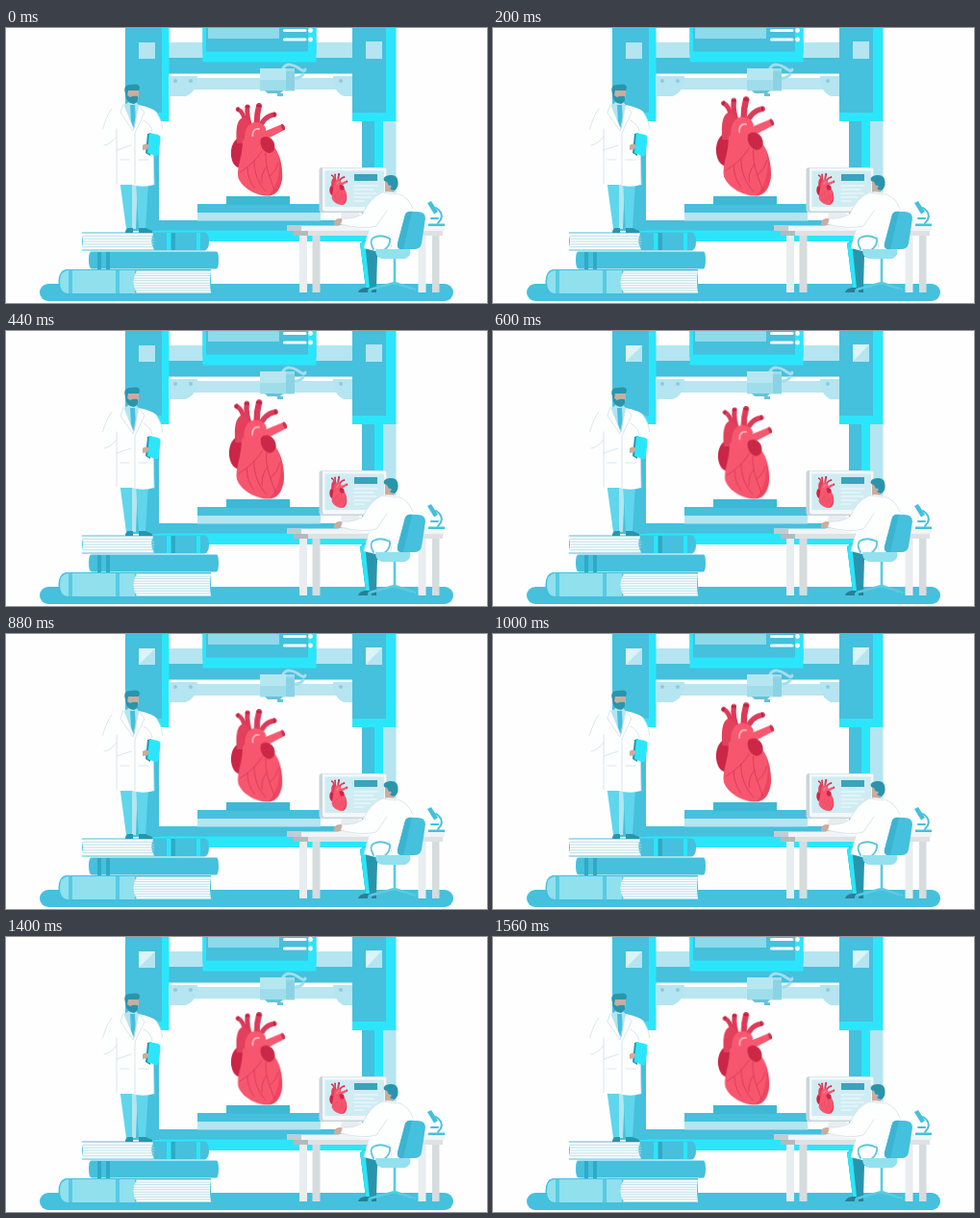
Animation of 500 by 286 pixels, one loop 1600 ms. Source, as an HTML page:

```html
<!DOCTYPE html>
<html lang="en">
<head>
<meta charset="utf-8">
<title>Heart printer</title>
<style>
html, body { margin: 0; width: 100%; height: 100%; overflow: hidden; background: #fefefe; }
svg { display: block; width: 100vw; height: 100vh; }
.m { fill: #45c0dd; }
.c { fill: #2be6fa; }
.l { fill: #b4e5f0; }
.d { fill: #2995ad; }
.w { fill: #fdfefe; }
.g { fill: #e9edef; }
.skin { fill: #c9ada0; }
.line { fill: none; stroke-linecap: round; stroke-linejoin: round; }
.fold { stroke: #cfe0e7; stroke-width: .8; }
#heart { transform-origin: 262px 174.5px; animation: beat 800ms step-end infinite; }
.glint { fill: #eefafc; animation: glint 1600ms step-end infinite; }
@keyframes beat { 0% { transform: none; } 25% { transform: scale(1.07); } 75% { transform: none; } }
@keyframes glint { 0% { opacity: 0; } 37.5% { opacity: .7; } }
</style>
</head>
<body>
<svg viewBox="0 0 500 286" preserveAspectRatio="none">
<defs>
  <g id="organ">
    <path d="M244 114C237 114 233 124 234 133C235 141 239 146 245 146L253 122Z" fill="#cb2648"/>
    <g class="line" stroke="#dc3a58" stroke-width="5" stroke-linecap="butt">
      <path d="M241 84.500Q247 87 249 100" stroke-width="4.500"/>
      <path d="M251 82Q250 92 254 103"/>
      <path d="M263 81Q260 92 261 104" stroke-width="6"/>
      <path d="M279 90Q267 92 263 106"/>
    </g>
    <path d="M240 120C238 104 241 91 249 94C254 97 255 104 254 120Z" fill="#e2405c"/>
    <path d="M249 122C246 106 252 97 261 98C268 99 271 104 270 107L287 100Q291 102 289.500 106L270 116L263 129Z" fill="#f7586f"/>
    <path d="M257 117C255 108 258 104 263 105" class="line" stroke="#fbb0b8" stroke-width="1.800"/>
    <path d="M246 117C252 110 262 114 270 116C279 121 285 131 286.500 144C288 160 283 173 273 174.500C261 175 246 167 241.500 156C239 146 246 135 246 117Z" fill="#f7566f"/>
    <path d="M283 132C286 141 288 150 287 158C285 168 281 174 273 174.500C283 163 286 148 283 132Z" fill="#ed4560"/>
    <path d="M265 115C269 111 276 113 278.500 119C281 125 278 130 273 130C267 129 263 121 265 115Z" fill="#cb2848"/>
    <ellipse cx="288" cy="103" rx="1.600" ry="3.400" fill="#cf3050" transform="rotate(-24 288 103)"/>
    <g fill="#bd2442">
      <ellipse cx="241" cy="84.500" rx="2.400" ry="1.300" transform="rotate(-60 241 84.500)"/>
      <ellipse cx="251" cy="82" rx="2.600" ry="1.200"/>
      <ellipse cx="263" cy="81" rx="3" ry="1.300" transform="rotate(9 263 81)"/>
      <ellipse cx="279" cy="90" rx="1.300" ry="2.600" transform="rotate(-10 279 90)"/>
    </g>
    <g class="line" stroke="#cf3852" stroke-width=".7">
      <path d="M266 128C259 139 251 145 243 150M258 138C258 151 262 161 270 170M251 145Q251 157 258 166"/>
      <path d="M270 130C269 146 276 158 279 169M271 144Q265 151 266 161M274 154Q281 149 283 140"/>
    </g>
  </g>
</defs>

<rect width="500" height="286" fill="#fefefe"/>

<!-- printer -->
<rect x="35" y="266" width="430" height="18" rx="9" class="m"/>
<path class="l" d="M124 95h7v105h-7zM392 95h13.500v105h-13.500z"/>
<path class="c" d="M147 210h250v12h-250zM383 95h9v120h-9z"/>
<path class="m" d="M131 95h28v116h-28zM370 95h13v116h-13z"/>
<path class="m" d="M158 200h226v10.500h-226z"/>
<path class="l" d="M199 191h128v9.500h-128z"/>
<path class="m" d="M199 183h128v9h-128z"/>
<path d="M229 175h66v9h-66z" fill="#3fb8d5"/>
<path class="l" d="M169 15h192v17h-192z"/>
<path class="m" d="M169 31h192v16.500h-192z"/>
<path class="c" d="M124 0h45.500v97h-45.500zM360 0h45.500v97h-45.500z"/>
<path class="m" d="M124 0h38v88h-38zM360 0h35v88h-35z"/>
<path class="l" d="M138 15h17v17h-17zM374 14h17v18h-17z"/>
<path class="glint" d="M138 32V15h17zM374 32V14h17z"/>
<path d="M190 52h160v12h-160z" fill="#b9e6f0"/>
<path class="l" d="M169.500 50H199Q199 66 187 71H169.500zM360 50H340Q340 66 351 71H360z"/>
<g fill="#8fcbdc"><circle cx="176" cy="55" r="2"/><circle cx="192" cy="55" r="2"/><circle cx="348" cy="55" r="2"/></g>
<path class="m" d="M204.500 0h118v27h-118z"/>
<path class="c" d="M204.500 24.500h118v11h-118zM204.500 0h3.500v28h-3.500zM314 0h8.500v28h-8.500z"/>
<path d="M210 0h74v11h-74z" fill="#8ed9ea"/>
<g class="line" stroke="#f4fdff" stroke-width="3.200">
  <path d="M289.500 2.500H311M289.500 12H311"/>
</g>
<g class="w"><circle cx="316.500" cy="2.500" r="2.400"/><circle cx="316.500" cy="12" r="2.400"/></g>
<path class="line" stroke="#a2deeb" stroke-width="3" d="M288 42C291 36 299 38 303 41S311 46 311 43M298 52Q305 53 309 48"/>
<path d="M264 42h36v23.500h-36z" fill="#9fddeb"/>
<path d="M264 42h27v12h-27z" fill="#b6e7f1"/>
<path d="M291 45h9v20h-9z" fill="#8bd3e4"/>
<path d="M269 65h19l-3 3h-13zM282 68h6v3h-6z" fill="#66c3d9"/>

<g id="heart"><use href="#organ"/></g>

<!-- books -->
<path class="m" d="M62 251H213V277H62Q54.500 275 54.500 264T62 251z"/>
<path d="M64 252H134V276H64Q56 275 56 264T64 252z" fill="#90e0ee"/>
<path d="M65 252h4v24h-4zM114 252h4v24h-4z" fill="#55cbe3"/>
<path class="w" d="M136 252.500H213Q211 264 213 275.500H136Q129 264 136 252.500z"/>
<path class="m" d="M89 232.500H219Q221 233 221 241T219 250.500H89Q86 250 86 241T89 232.500z"/>
<path d="M95 233h4v18h-4zM104 233h4v18h-4z" fill="#30a9c6"/>
<path class="m" d="M79 212.500H207Q211 214 211 222T207 231.500H79z"/>
<path class="c" d="M167 213h4v18h-4zM198 213h4v18h-4z"/>
<path d="M172 213h4v18h-4z" fill="#30a9c6"/>
<path class="w" d="M78 213.500H153Q149 222 154 230.500H78Q82 222 78 213.500z"/>
<g id="pages" class="line" stroke="#b0dce6" stroke-width=".9"></g>

<!-- standing doctor -->
<path d="M118 157H134L131 209H125z" fill="#5fd6ec"/>
<path class="l" d="M131 160H137L135 209H131z"/>
<path d="M135 160H148L145 209H138z" fill="#5fd6ec"/>
<path class="d" d="M124 213Q124 209 127 208H132V213zM138 213V208H145L152 211Q153 213 151 213z"/>
<path class="skin" d="M127 73h9v9h-9z"/>
<path class="l" d="M121 81L128 77H135L139 81L135 107H132z"/>
<path class="m" d="M129 80h5l1 20-2 5-3-8z"/>
<path class="w" d="M122 79L133 106L138 80Q152 83 156 87Q163 98 162.500 105Q161 112 153 118L154 163Q145 166 135 164L132 163H114L115 127Q107 127 104 124Q99 115 100.500 105Q105 90 110 84Q116 81 122 79z"/>
<path class="line fold" d="M122 79L119 88L132 107L138 80L144 88L134 109V163M115 127V162M115 105V127L130 122M153 118L154 163M119 137H128M138 137H148M102 122Q109 121 115 113M143 96Q151 100 152 108M100.500 105Q105 90 110 84M156 87Q163 98 162.500 105"/>
<path class="d" d="M147 110L151 109L150 133L145 130z"/>
<path class="c" d="M149 109L158 111Q161 112 160.500 115L159 130Q158 134 155 133L147 130z"/>
<path class="skin" d="M142 122Q145 119 149 122L147 126L142 127z"/>
<path class="skin" d="M125 63H138V72Q137 77 131 78Q126 76 125 71z"/>
<path class="d" d="M124 68Q121 59 130 59Q139 57 139 62L138 65L127 65L126 70L129 72Q132 70 137 71Q138 77 133 79Q125 79 124 68z"/>

<!-- desk and monitor -->
<path d="M325.500 148Q325.500 145 329 145H394Q396 145 396 147V190Q396 192 394 192H329Q325.500 192 325.500 189z" fill="#c9d5da"/>
<path d="M329 145.500H394Q395.500 145.500 395.500 147V189Q395.500 190.500 394 190.500H331Q329 190 329 188z" fill="#f3f8fa"/>
<path d="M331.500 148.500H393V186H331.500z" fill="#d0ecf3"/>
<use href="#organ" transform="translate(257.500 124.300) scale(.337 .342)"/>
<path d="M362 152h24v7h-24z" fill="#3ba3bc"/>
<path class="line" d="M362 164H386M362 168H382M362 172H385M362 176H379M362 180H372" stroke="#f2fafc" stroke-width="1.200"/>
<path class="g" d="M349 192h18l3 14h-24z"/>
<path class="g" d="M305 215h8v60h-8zM428.500 215h8v60h-8z"/>
<path d="M318.500 215h8v60h-8zM443 215h7.500v60h-7.500z" fill="#d6dbde"/>
<path d="M299 210H454V216H299z" fill="#dde2e5"/>
<path d="M299 210h15v6h-15z" fill="#b0bbc1"/>
<path d="M292 205.500H456V211H292z" fill="#f1f4f5"/>
<path d="M292 205.500h15v5.500h-15z" fill="#c3ccd1"/>

<!-- microscope -->
<path class="m" d="M438 182L442 180L449 191L445 193.500zM439 203.500H456V206H439z"/>
<path class="line" d="M447 187Q455 192 452 199L449 203M442 198H449" stroke="#45c0dd" stroke-width="2"/>

<!-- seated doctor -->
<path class="d" d="M368 224Q376 217 395 220V238H386L385 271H374z"/>
<path class="c" d="M368 224L373 221L378 271H374z"/>
<path d="M366 275Q367 271 373 270H385V275z" fill="#287f96"/>
<path class="skin" d="M341 202Q342 198 348 198L353 201L349 205H341zM394 165h9v9h-9z"/>
<path class="w" d="M391 171Q398 169 407 172Q419 176 423 188L421 232H384L372 229L377 210Q365 209 348 204L350 198Q362 199 371 193Q378 177 391 171z"/>
<path class="line fold" d="M391 171Q378 177 371 193Q362 199 350 198M348 204Q370 210 385 206L396 190M372 229L377 210M391 171L406 173M407 172Q419 176 423 188M398 215L401 228"/>
<path class="skin" d="M394 157H404V169Q396 171 394 166z"/>
<path class="d" d="M393 159Q391 154 399 153Q407 152 407.500 160Q408 166 404 169L400 168L398 164L396 160z"/>
<circle cx="399" cy="165" r="1.600" class="skin"/>

<!-- chair -->
<path class="line" d="M382 230Q377 221 382 218Q390 214 399 219Q400 226 393 231" stroke="#58c6de" stroke-width="1.800"/>
<path class="line" d="M404 239V266M378 272L404 265L425 272" stroke="#58cbe2" stroke-width="2.600"/>
<g class="m"><circle cx="378" cy="274" r="2.200"/><circle cx="404" cy="274" r="2.200"/><circle cx="423" cy="274" r="2.200"/></g>
<path d="M384 230H420Q422 237 415 240H391Q384 239 384 230z" fill="#93e1ef"/>
<path class="m" d="M415 194Q417 190 425 191Q436 190 436 198L432 224Q431 230 424 230H410Q406 229 407 224z"/>
<path d="M415 194Q417 190 422 191L413 230H410Q406 229 407 224z" fill="#3cb4d1"/>
</svg>
<script>
const pages = document.getElementById("pages");

function rule(x1, x2, top, bottom, bow) {
  const count = Math.round((bottom - top) / 2.7);
  let d = "";
  for (let i = 0; i <= count; i++) {
    const k = i / count;
    const shift = bow * Math.sin(Math.PI * k);
    d += `M${x1 + shift} ${top + k * (bottom - top)}H${x2 + shift}`;
  }
  const path = document.createElementNS("http://www.w3.org/2000/svg", "path");
  path.setAttribute("d", d);
  pages.append(path);
}

rule(79, 152, 213.5, 230.5, 2);
rule(135, 213, 252.5, 275.5, -2);
</script>
</body>
</html>
```
